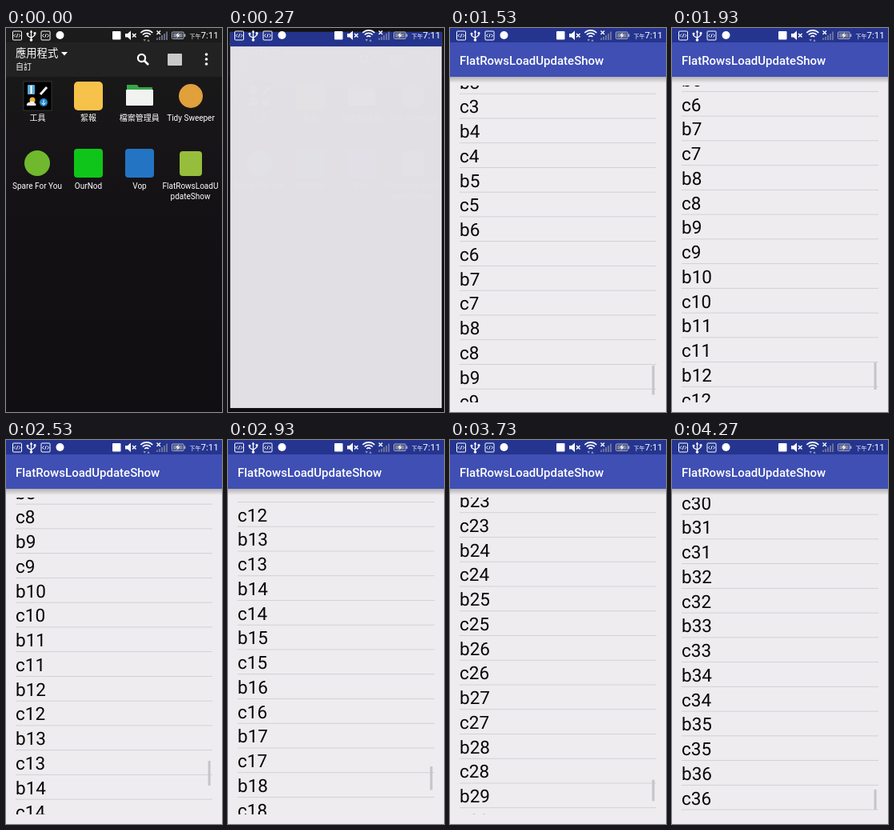
Recreate the animation shown at these times as an HTML page. Size 270 by 480 pixels, loop 4.34 s.

```html
<!DOCTYPE html>
<html lang="zh-Hant">
<head>
<meta charset="utf-8">
<title>List demo</title>
<style>
html, body { margin: 0; width: 100%; height: 100%; overflow: hidden; background: #0c0c0c; }
svg { display: block; width: 100%; height: 100%; font-family: Roboto, "Noto Sans CJK TC", "Noto Sans CJK", sans-serif; }
.label { font-size: 10px; fill: #fff; text-anchor: middle; }
.row { font-size: 22.5px; fill: #060606; text-rendering: geometricPrecision; }
</style>
</head>
<body>
<svg viewBox="0 0 270 480">
  <defs>
    <linearGradient id="night" x2="0" y2="1">
      <stop offset="0" stop-color="#1d1c1d"/><stop offset=".13" stop-color="#191819"/>
      <stop offset=".5" stop-color="#141114"/><stop offset="1" stop-color="#110e12"/>
    </linearGradient>
    <linearGradient id="shade" x2="0" y2="1">
      <stop offset="0" stop-color="#000" stop-opacity=".25"/><stop offset="1" stop-color="#000" stop-opacity="0"/>
    </linearGradient>
    <clipPath id="listClip"><rect x="12" y="72" width="246" height="396"/></clipPath>
    <g id="code" fill="none" stroke="#fff">
      <rect x=".5" y=".5" width="11" height="11" rx="1"/>
      <path d="M4 4 2 6 4 8M8 4l2 2-2 2M6.6 3.8 5.4 8.2"/>
    </g>
  </defs>

  <g id="home">
    <rect width="270" height="480" fill="url(#night)"/>
    <rect y="18" width="270" height="43" fill="#222"/>
    <g fill="#fff">
      <text x="12" y="36" font-size="13.3" font-weight="500">應用程式</text>
      <text x="12" y="52" font-size="10" font-weight="500">自訂</text>
      <path d="M69 30h8l-4 4.5z"/>
      <circle cx="169.5" cy="37.5" r="4.6" fill="none" stroke="#fff" stroke-width="2.2"/>
      <path d="M173 41l5 5" stroke="#fff" stroke-width="2.6"/>
      <rect x="202" y="32" width="18" height="15" rx="1" fill="#c9c9c9"/>
      <circle cx="250.5" cy="33" r="1.8"/><circle cx="250.5" cy="39" r="1.8"/><circle cx="250.5" cy="45" r="1.8"/>
    </g>
    <rect x="22" y="67" width="35" height="36" fill="#000" stroke="#444" stroke-width=".7"/>
    <rect x="27" y="71" width="9" height="12" rx="1" fill="#5ba9d8"/>
    <path d="M31.5 72v10" stroke="#fff" stroke-width="2"/>
    <path d="M43 83l8-9" stroke="#eee" stroke-width="3"/>
    <circle cx="33" cy="90" r="3.5" fill="#f5b52d"/>
    <path d="M26 97a3 3 0 0 1 3-4 4 4 0 0 1 7 1 2 2 0 0 1 1 3z" fill="#eee"/>
    <circle cx="47" cy="93" r="5" fill="#2487cf"/>
    <path d="M47 90v6m-2.5-2.5L47 96l2.5-2.5" stroke="#fff" fill="none"/>
    <rect x="85" y="67" width="36" height="36" rx="5" fill="#f7c24a"/>
    <path d="M151 71h13l2 3h17v10h-32z" fill="#34a544"/>
    <rect x="150" y="77" width="34" height="20" rx="1" fill="#f1f3f1"/>
    <circle cx="231" cy="85" r="15" fill="#e0a03c"/>
    <circle cx="39" cy="169" r="16" fill="#70b82e"/>
    <rect x="85" y="151" width="36" height="36" rx="4" fill="#10c51a"/>
    <rect x="149" y="151" width="36" height="36" rx="4" fill="#2474c4"/>
    <rect x="217" y="154" width="28" height="31" rx="4" fill="#97bd3c"/>
    <g class="label">
      <text x="39.5" y="116">工具</text><text x="103" y="116">絮報</text>
      <text x="166.7" y="116">檔案管理員</text><text x="231" y="116">Tidy Sweeper</text>
      <text x="39" y="201">Spare For You</text><text x="103" y="201">OurNod</text>
      <text x="167" y="201">Vop</text>
      <text x="230.5" y="201">FlatRowsLoadU</text><text x="230.5" y="214">pdateShow</text>
    </g>
  </g>

  <rect id="dim" width="270" height="480" fill="#0d0911"/>

  <g id="app">
    <rect id="page" width="270" height="480"/>
    <rect width="270" height="18.5" fill="#25358f"/>
    <g id="content">
      <rect y="61" width="270" height="8" fill="url(#shade)"/>
      <rect y="18" width="270" height="43" fill="#3f4fb3"/>
      <text x="12" y="45.5" font-size="15" font-weight="500" fill="#fff">FlatRowsLoadUpdateShow</text>
      <g id="list" clip-path="url(#listClip)"></g>
      <rect id="thumb" x="252.6" width="3" fill="#c5c4c8"/>
    </g>
  </g>

  <g fill="#fff">
    <use href="#code" x="8" y="3.5"/>
    <use href="#code" x="43.5" y="3.5"/>
    <path d="M31.5 15V4M27 7.5v2.2l4.5 2.8 4.5-3.6V6.5" fill="none" stroke="#fff" stroke-width="1.3"/>
    <path d="M29.7 5.5l1.8-3 1.8 3z"/><circle cx="31.5" cy="15" r="1.8"/>
    <circle cx="27" cy="7.2" r="1.4"/><rect x="34.7" y="5.2" width="2.7" height="2.7"/>
    <circle cx="67.5" cy="9" r="5"/>
    <rect x="133" y="4" width="10.5" height="10.5" rx="1"/>
    <path d="M149 7h3l4-3.5v11.5l-4-3.5h-3z"/>
    <path d="M158 7l4.5 4.5m0-4.5L158 11.5" stroke="#fff" stroke-width="1.5"/>
    <path d="M168.3 6a10.5 10.5 0 0 1 15 0M170.8 8.5a7 7 0 0 1 10 0M173.2 11a4 4 0 0 1 5.2 0" fill="none" stroke="#fff" stroke-width="1.6"/>
    <path d="M171.5 14h3.4l-1.7 2.8zM176.3 16.8h3.4l-1.7-2.8z" opacity=".5"/>
    <path d="M188.5 3.5l4.500 4.500m0-4.500l-4.500 4.500" stroke="#fff" stroke-width="1.4"/>
    <path d="M189 15v-2.5M192 15v-4M195 15V9M198 15V7M201 15V4.5" stroke="#7c80a0" stroke-width="1.6"/>
    <rect x="207.5" y="5" width="14.5" height="8.5" rx="1" fill="none" stroke="#b0b3c2"/>
    <rect x="209" y="6.5" width="11.5" height="5.5" fill="#7d8195"/>
    <rect x="222.5" y="7.5" width="1.8" height="3.5" fill="#b0b3c2"/>
    <path d="M216 5.5l-4 4h2.5l-1 3.5 4-4.5H215z"/>
    <text x="229.5" y="13" font-size="7">下午</text>
    <text x="243.5" y="13.3" font-size="11.5">7:11</text>
  </g>
</svg>
<script>
const LOOP = 4340, STEPS_PER_MS = 0.015;
const ROW = 30.75, ROW_ZERO = 54.4, POOL = 16;
const APP_READY = 12, LIST_READY = 13;

// Pairs of step and value.
const scrollKeys = [[13, -33.6], [17, 0], [29, 358], [38, 480.2], [49, 1007.4], [64, 1851]];
const thumbTop = [[17, 426], [29, 418], [38, 401], [49, 414], [64, 437]];
const thumbSize = [[17, 39], [29, 34], [38, 31], [49, 28], [64, 25]];

const $ = id => document.getElementById(id);
const make = (tag, attrs) => {
  const node = document.createElementNS('http://www.w3.org/2000/svg', tag);
  for (const name in attrs) node.setAttribute(name, attrs[name]);
  return $('list').appendChild(node);
};
const show = (node, visible) => { node.style.display = visible ? '' : 'none'; };

const rows = Array.from({ length: POOL }, () => ({
  label: make('text', { x: 12, class: 'row' }),
  line: make('rect', { x: 12, width: 246, height: 0.9, fill: '#d0ced3' })
}));

const slope = (keys, i) => (keys[i + 1][1] - keys[i][1]) / (keys[i + 1][0] - keys[i][0]);

function segment(keys, x) {
  let i = 0;
  while (i < keys.length - 2 && x >= keys[i + 1][0]) i++;
  const span = keys[i + 1][0] - keys[i][0];
  return { i, span, u: Math.min(1, Math.max(0, (x - keys[i][0]) / span)) };
}

function linear(keys, x) {
  const { i, u } = segment(keys, x);
  return keys[i][1] + (keys[i + 1][1] - keys[i][1]) * u;
}

// Cubic curve with harmonic-mean tangents, so it never runs backwards.
function smooth(keys, x) {
  const { i, span, u } = segment(keys, x);
  const tangent = j => {
    if (j === 0) return slope(keys, 0);
    if (j === keys.length - 1) return slope(keys, j - 1);
    const a = slope(keys, j - 1), b = slope(keys, j);
    return 2 * a * b / (a + b);
  };
  const v = 1 - u;
  return keys[i][1] * v * v * (1 + 2 * u) + keys[i + 1][1] * u * u * (3 - 2 * u)
    + span * u * v * (tangent(i) * v - tangent(i + 1) * u);
}

function drawList(step) {
  const scroll = smooth(scrollKeys, step);
  const first = Math.max(0, Math.floor((scroll + 72 - ROW_ZERO - 14) / ROW));
  rows.forEach(({ label, line }, n) => {
    const i = first + n, y = ROW_ZERO + i * ROW - scroll;
    label.textContent = 'bc'[i % 2] + (i >> 1);
    label.setAttribute('y', y + 7.4);
    line.setAttribute('y', y + 13.5);
  });
  $('thumb').setAttribute('y', linear(thumbTop, step));
  $('thumb').setAttribute('height', linear(thumbSize, step));
}

function draw(time) {
  const step = Math.floor((time % LOOP) * STEPS_PER_MS + 0.1);
  const u = Math.min(1, Math.max(0, (step - 1.5) / 4.5));
  const open = step < 2 ? 0 : 1 - (1 - u) ** 2.8;
  const scale = 0.8 + 0.2 * open;
  const app = $('app');
  app.setAttribute('transform', `translate(135 240) scale(${scale}) translate(-135 -240)`);
  app.setAttribute('opacity', Math.min(1, open * 1.09));
  show(app, open > 0);
  show($('home'), open < 1);
  $('dim').setAttribute('opacity', open * 0.6);
  $('page').setAttribute('fill', step < APP_READY ? '#e7e5ea' : '#eeecef');
  show($('content'), step >= APP_READY);
  show($('list'), step >= LIST_READY);
  show($('thumb'), step >= LIST_READY);
  if (step >= LIST_READY) drawList(step);
}

const start = performance.now();
function tick() {
  draw(performance.now() - start);
  requestAnimationFrame(tick);
}
tick();
</script>
</body>
</html>
```
